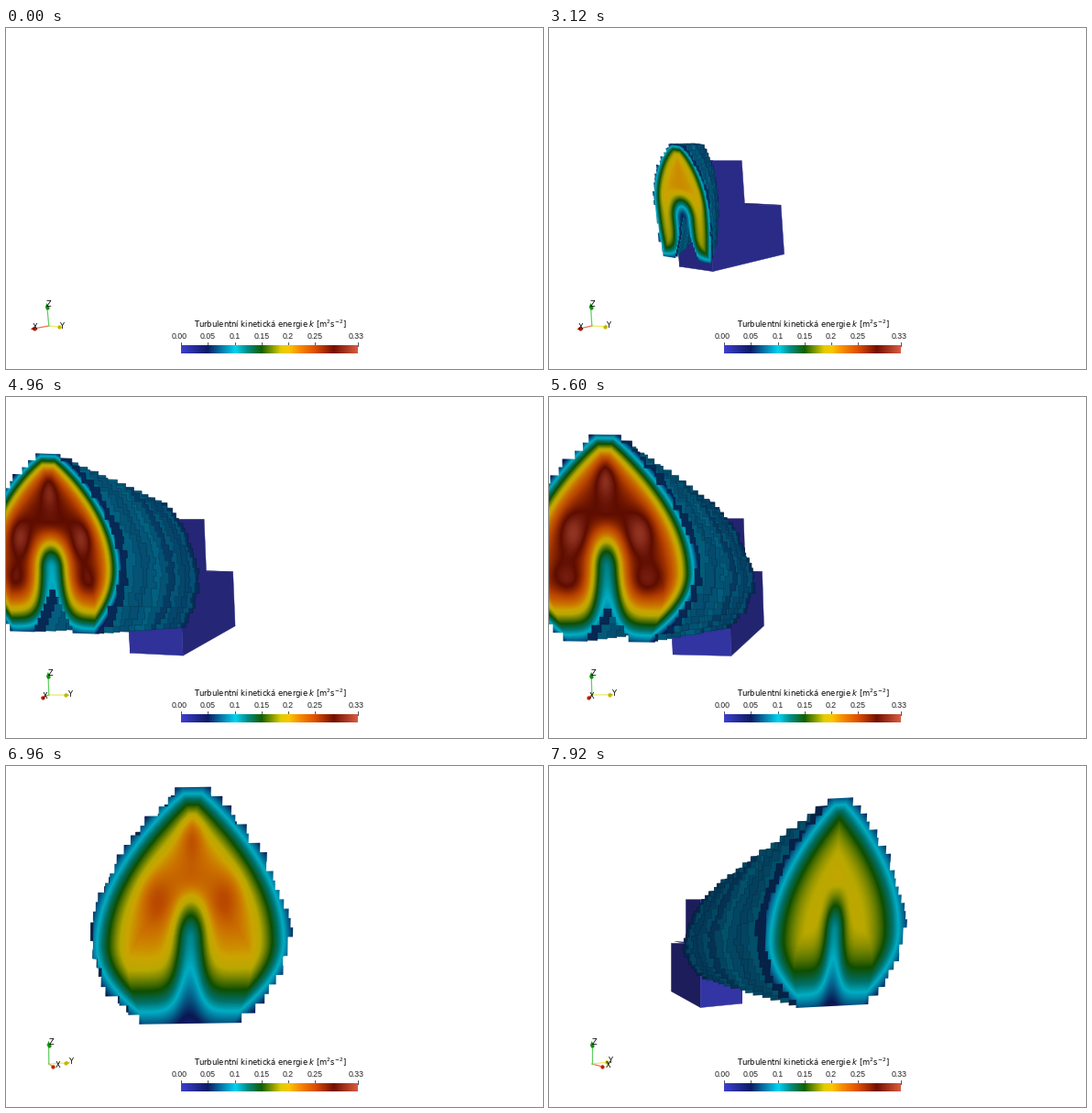
A matplotlib script that plays this animation: 586x372 px, repeating every 8000 ms.

```python
import numpy as np
import matplotlib.pyplot as plt
from matplotlib.animation import FuncAnimation
from matplotlib.collections import PolyCollection
from matplotlib.colors import LinearSegmentedColormap
from matplotlib.patches import Polygon

W, H, DPI = 586, 372, 100
FRAMES, STEP = 100, 80
LAST = (FRAMES - 1) * STEP
FIELD_W, FIELD_H = 400, 300
ROWS, LAYERS = 25, 13
BUILD_START, BUILD_END = 840, 2640
KMAX = 0.33


def px(size):
    return size * 72 / DPI


def smoothstep(x, start, end):
    s = np.clip((x - start) / (end - start), 0, 1)
    return s * s * (3 - 2 * s)


def keyed(table, t):
    """Smooth interpolation through rows of (time, values...)."""
    table = np.asarray(table, float)
    times, values = table[:, 0], table[:, 1:]
    slopes = np.gradient(values, times, axis=0)
    t = np.clip(t, times[0], times[-1])
    i = np.clip(np.searchsorted(times, t) - 1, 0, len(times) - 2)
    span = times[i + 1] - times[i]
    s = (t - times[i]) / span
    return ((2 * s**3 - 3 * s**2 + 1) * values[i]
            + (s**3 - 2 * s**2 + s) * span * slopes[i]
            + (3 * s**2 - 2 * s**3) * values[i + 1]
            + (s**3 - s**2) * span * slopes[i + 1])


# Position along the bar and colour; the hues repeat dark-bright per band
STOPS = [(0, "#3e3ecd"), (.15, "#0c1c64"), (.306, "#00d4f0"), (.375, "#008c87"),
         (.455, "#125f00"), (.565, "#e1cd00"), (.61, "#f8c800"), (.67, "#f88c00"),
         (.76, "#de4e00"), (.865, "#730f00"), (1, "#d85c42")]
cmap = LinearSegmentedColormap.from_list("energy", STOPS, 512)


def yaw(t):
    return np.radians(56 - 90 * (t / LAST)**2)


def closeness(t):
    """How near the camera is to the building, from 0 to 1."""
    return np.exp(-((t - 5400) / 1900)**2)


# Cutting plane: time, apex x, half width, top, bottom
PLANE_PATH = [(2640, 160, 22, 144, 256), (3520, 118, 37, 114, 250),
              (4240, 67, 50, 89, 243), (4900, 46, 73, 64, 256),
              (5600, 61, 98, 41, 267), (6160, 105, 108, 32, 282),
              (6960, 204, 109, 23, 281), (7920, 318, 77, 35, 262)]


class Building:
    """Two-step block seen in perspective; s runs from its back (0) to its front (1)."""

    def __init__(self, t):
        a, near, p = yaw(t), closeness(t), t / LAST
        self.middle = 160 + 28 * p**4
        self.foot_y = 257 + 25 * near
        self.low_y = 194 - 3.5 * near
        self.tower_y = 148.5 - 16 * near
        self.lean = .11 * (1 - p)
        self.vanish = np.array([235 + 330 * a, self.low_y])
        self.pull = .23 + .13 * near
        self.half = np.array([33 * np.cos(a)**2, 4 * np.sin(a)])
        self.shades = .8 - .36 * p, .8 * np.cos(max(a, 0))

    def base(self, side, s):
        front = np.array([self.middle, self.foot_y]) + side * self.half
        return front + (self.vanish - front) * self.pull * (1 - s)

    def raised(self, side, s, y):
        foot = self.base(side, s)
        return np.array([foot[0] - self.lean * (foot[1] - y), y])

    def wall(self, side, q):
        pts = [self.base(side, 0), self.base(side, q)]
        if q > .5:
            pts += [self.raised(side, s, self.tower_y) for s in (q, .5)]
        return pts + [self.raised(side, s, self.low_y) for s in (min(q, .5), 0)]

    def faces(self, q):
        cut_y = self.tower_y if q > .5 else self.low_y
        m = min(q, .5)
        roof = [self.raised(1, 0, self.low_y), self.raised(-1, .12, self.low_y - 2),
                self.raised(-1, m, self.low_y), self.raised(1, m, self.low_y)]
        cut = [self.base(1, q), self.base(-1, q),
               self.raised(-1, q, cut_y), self.raised(1, q, cut_y)]
        y_shade, x_shade = self.shades
        blue = np.array([64, 66, 205]) / 255
        return ([self.wall(-1, q), roof, self.wall(1, q), cut],
                [blue * y_shade, blue * .56, blue * y_shade, blue * x_shade])


class Flow:
    """Shape of the wake: a hollow arch that fills out, then fades."""

    def __init__(self, t):
        grown = smoothstep(t, BUILD_END, 4240)
        full = smoothstep(t, 4240, 5400)
        decay = np.clip((t - 5600) / (LAST - 5600), 0, 1)
        self.widest = .55 + .11 * full
        self.power = .6 + .25 * full
        self.taper = .14 + .41 * full
        self.notch_top = .58 + .25 * full + .27 * decay
        self.notch_w = .42 - .17 * full
        self.peak = .19 + .10 * grown - .09 * decay
        self.edge = .28 + .12 * decay
        self.gap_depth = .75 - .18 * full - .18 * decay
        self.gap_w = .37 - .18 * full - .04 * decay
        self.spot_u = .6 - .22 * full - .05 * decay
        strength = .035 * grown * (1 - decay**2)
        self.spots = [(0, .21, .12, .09, strength * (.2 + .8 * full))]
        for sign in (-1, 1):
            self.spots += [
                (sign * self.spot_u, .47, .15, .10, strength),
                (sign * (self.spot_u + .06), .71, .18, .08,
                 strength * full * (1 - decay)**3)]

    def half_width(self, v):
        rise = np.sin(np.pi / 2 * np.clip(v / self.widest, 0, 1))**self.power
        fall = np.clip((v - self.widest) / (1 - self.widest), 0, 1)**2
        return .1 + .9 * rise - self.taper * fall

    def energy(self, pose):
        """Turbulent energy on the cutting plane, one value per pixel."""
        cx, hw, top, bottom, lean, tilt = pose
        height = bottom - top
        u = (xs - cx - lean * (ys - top) / height) / hw
        v = np.clip((ys - top - tilt * u) / height, 0, 1)
        aspect = height / hw
        width = self.half_width(v)
        slope = np.gradient(width, axis=0) * hw
        side = (width - np.abs(u)) / np.sqrt(1 + slope**2)
        dist = np.minimum(side, np.minimum(v, .55 * (1 - v)) * aspect)
        k = .07 + (self.peak - .07) * np.tanh(np.maximum(dist, -.06) / self.edge)
        for u0, v0, ru, rv, amount in self.spots:
            k = k + amount * np.exp(-((u - u0) / ru)**2 - ((v - v0) / rv)**2)
        gap = self.gap_depth * smoothstep(v, .36, .64) * np.exp(-(u / self.gap_w)**2)
        return k * (1 - gap)

    def outline(self, pose, jitter):
        """Stepped outline of one cross-section, with a notch between its legs."""
        cx, hw, top, bottom, lean, tilt = pose
        edges = np.linspace(0, 1, ROWS + 1)
        mid = (edges[1:] + edges[:-1]) / 2
        cell = 1 / 22
        width = np.round(self.half_width(mid) / cell) * cell
        steps = np.repeat(edges, 2)[1:-1]
        right = np.repeat(width + jitter[0], 2)
        left = -np.repeat(width + jitter[1], 2)
        notch = np.clip((mid - self.notch_top) / max(1 - self.notch_top, .04), 0, 1)
        inner = np.repeat(np.round(notch * self.notch_w / cell) * cell, 2)
        u = np.concatenate([right, inner[::-1], -inner, left[::-1]])
        v = np.concatenate([steps, steps[::-1], steps, steps[::-1]])
        legs = np.repeat(mid > self.notch_top, 2)
        always = np.ones_like(legs)
        keep = np.concatenate([always, legs[::-1], legs, always])
        points = [cx + lean * v + u * hw, top + v * (bottom - top) + tilt * u]
        return np.column_stack(points)[keep]


xs = np.arange(FIELD_W)[None, :] + .5
ys = np.arange(FIELD_H)[:, None] + .5
rng = np.random.default_rng(4)
ragged = rng.integers(-1, 2, (LAYERS + 1, 2, ROWS)) * .025
layer_values = rng.uniform(.058, .082, LAYERS)

fig = plt.figure(figsize=(W / DPI, H / DPI), dpi=DPI, facecolor="white")
ax = fig.add_axes([0, 0, 1, 1])
ax.axis("off")

block = PolyCollection([], linewidths=.3, zorder=1)
wake = PolyCollection([], linewidths=.5, zorder=2)
ax.add_collection(block)
ax.add_collection(wake)
section = ax.imshow(np.ones((FIELD_H, FIELD_W, 3)), extent=(0, FIELD_W, FIELD_H, 0),
                    interpolation="nearest", aspect="auto", zorder=3)

# Colour bar
ax.imshow(np.linspace(0, 1, 386)[None, :], cmap=cmap, extent=(191, 384, 355.5, 347),
          aspect="auto", zorder=5)
ax.text(288, 323.5, r"Turbulentní kinetická energie $k$ [$\mathrm{m^2 s^{-2}}$]",
        fontsize=px(8.35), family="DejaVu Sans", ha="center", va="center")
for label in ("0.00", "0.05", "0.1", "0.15", "0.2", "0.25", "0.33"):
    value = float(label)
    x = 191.3 + 192.4 * value / KMAX
    shift = -2 if value in (0, KMAX) else 0
    ax.plot([x, x], [343, 347], color="#333333", lw=.6)
    ax.text(x + shift, 336.5, label, fontsize=px(8.8), family="Liberation Sans",
            ha="center", va="center", color="#222222")
ax.plot([0, W], [371.5, 371.5], color="#b4bab4", lw=px(1), zorder=6)

# Orientation axes: shaft colour, cone colour, label offset from the tip
ORIGIN = np.array([46.8, 325])
AXES = [("X", "#f07050", "#c02000", (4.3, -2)),
        ("Y", "#f0e860", "#c0b800", (1, -1)),
        ("Z", "#60d060", "#109010", (2.5, 2))]
triad = []
for name, line_color, cone_color, offset in AXES:
    shaft, = ax.plot([], [], color=line_color, lw=.9, zorder=6)
    cone = Polygon(np.zeros((3, 2)), color=cone_color, lw=0, zorder=7)
    ax.add_patch(cone)
    base_dot, = ax.plot([], [], "o", color=cone_color, ms=px(4.2), mew=0, zorder=7)
    label = ax.text(0, 0, name, fontsize=px(8.3), family="DejaVu Sans",
                    ha="center", va="center", zorder=8)
    triad.append((shaft, cone, base_dot, label, np.array(offset)))

ax.set_xlim(0, W)
ax.set_ylim(H, 0)


def draw_triad(t):
    a = yaw(t)
    vectors = np.array([(-24 * np.sin(a), 3.5),
                        (24 * np.cos(a), 2.5 * np.sin(a) - .7),
                        (-2.4 * (1 - t / LAST), -25)])
    for vec, (shaft, cone, base_dot, label, offset) in zip(vectors, triad):
        tip, foot = ORIGIN + vec, ORIGIN + vec * .8
        normal = np.array([-vec[1], vec[0]]) / np.hypot(*vec) * 2.1
        shaft.set_data(*zip(ORIGIN, foot))
        cone.set_xy([tip, foot + normal, foot - normal])
        base_dot.set_data([foot[0]], [foot[1]])
        label.set_position(tip + offset)


def draw_building(building, t):
    q = np.clip((t - BUILD_START) / (BUILD_END - BUILD_START), 0, 1)
    faces, colors = building.faces(q) if q > 0 else ([], "none")
    block.set_verts(faces)
    block.set_facecolor(colors)
    block.set_edgecolor(colors)


def draw_wake(building, t):
    visible = t > BUILD_END
    section.set_visible(visible)
    if not visible:
        wake.set_verts([])
        return
    flow, turn = Flow(t), np.sin(yaw(t))
    front = np.append(keyed(PLANE_PATH, t), [18 * turn, 7 * turn])
    back = np.array([building.middle + 3, front[1] * .5 + 4, building.tower_y - 18,
                     building.foot_y - 30, 4 * turn, 4 * turn])
    depths = (np.arange(LAYERS) / LAYERS)**1.2
    wake.set_verts([flow.outline(back + (front - back) * s, ragged[i])
                    for i, s in enumerate(depths)])
    faces = cmap(layer_values / KMAX)[:, :3] * (.9 - .32 * t / LAST)
    wake.set_facecolor(faces)
    wake.set_edgecolor(faces * .75)
    section.set_data(cmap(flow.energy(front) / KMAX)[..., :3] * .82)
    section.set_clip_path(Polygon(flow.outline(front, ragged[-1]),
                                  transform=ax.transData))


def update(i):
    t = i * STEP
    building = Building(t)
    draw_building(building, t)
    draw_wake(building, t)
    draw_triad(t)
    return []


anim = FuncAnimation(fig, update, frames=FRAMES, interval=STEP, repeat=True, repeat_delay=0)
plt.show()
```
